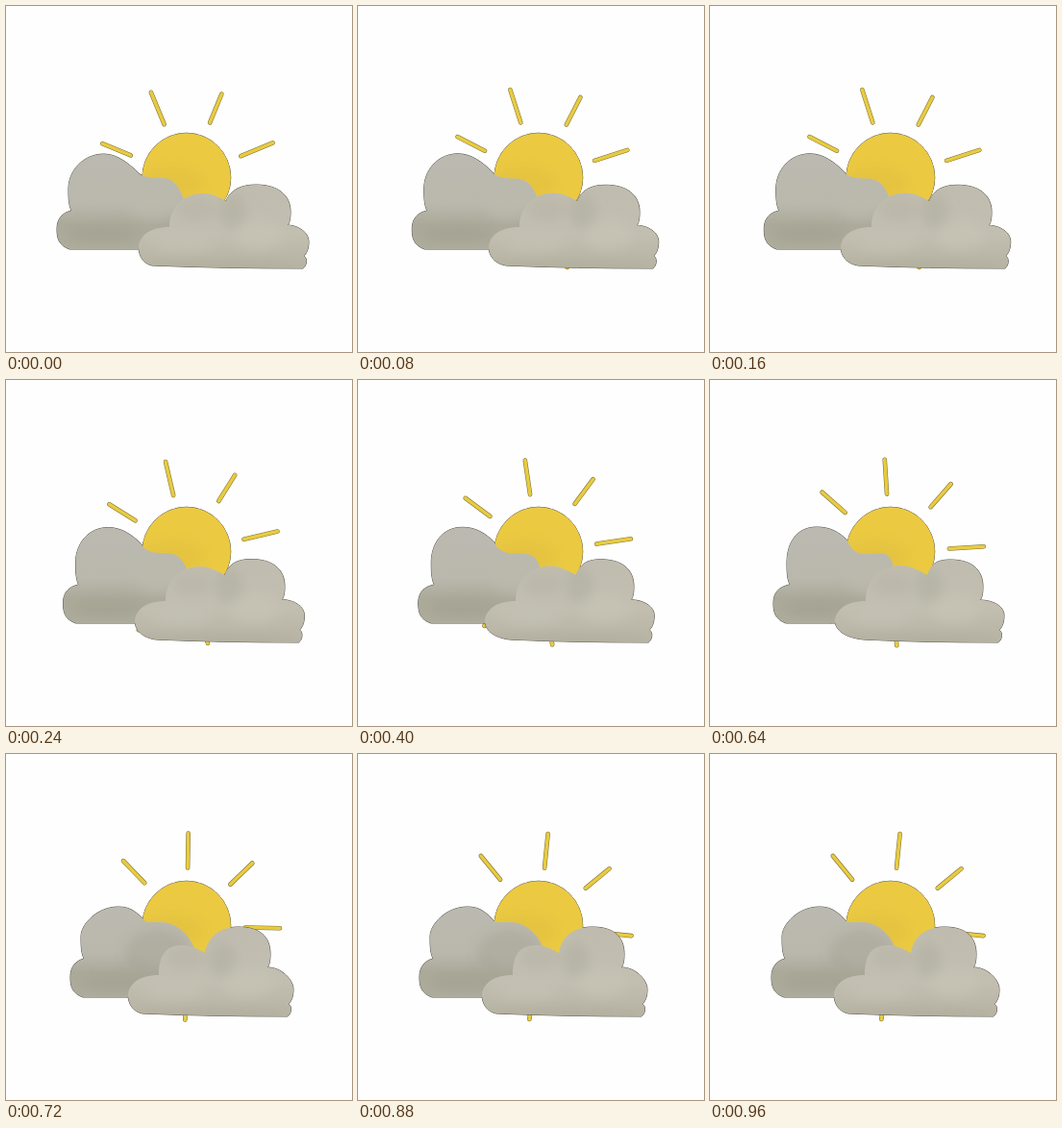
An HTML page for the animation above (1040 ms loop, 360x360 px).

```html
<!DOCTYPE html>
<html lang="en">
<head>
<meta charset="utf-8">
<title>Sun behind clouds</title>
<style>
  html, body { margin: 0; width: 100%; height: 100%; overflow: hidden; background: #fefefe; }
  svg { display: block; width: 100vw; height: 100vh; }
  .edge { fill: #56544a; stroke: #56544a; stroke-width: 1; }
  .soft { filter: url(#blur); }
  .rays line { stroke-linecap: round; }
  .rim { stroke: #7d7136; stroke-width: 4.6; }
  .ray { stroke: #e8cb40; stroke-width: 3.5; }
</style>
</head>
<body>
<svg viewBox="0 0 360 360">
  <defs>
    <path id="left"/>
    <path id="right"/>
    <ellipse id="sun" cx="187.8" cy="178.5" rx="46" ry="46.3"/>
    <clipPath id="inLeft"><use href="#left"/></clipPath>
    <clipPath id="inRight"><use href="#right"/></clipPath>
    <clipPath id="inSun"><use href="#sun"/></clipPath>
    <filter id="blur" x="-50%" y="-50%" width="200%" height="200%"><feGaussianBlur stdDeviation="6"/></filter>
    <linearGradient id="leftFill" gradientUnits="userSpaceOnUse" x1="0" y1="154" x2="0" y2="254">
      <stop offset="0" stop-color="#bbbab0"/>
      <stop offset=".52" stop-color="#bab8ad"/>
      <stop offset=".74" stop-color="#aba999"/>
      <stop offset="1" stop-color="#aeac9d"/>
    </linearGradient>
    <linearGradient id="rightFill" gradientUnits="userSpaceOnUse" x1="0" y1="182" x2="0" y2="273">
      <stop offset="0" stop-color="#bfbcaf"/>
      <stop offset=".6" stop-color="#c2bfb1"/>
      <stop offset="1" stop-color="#b6b3a3"/>
    </linearGradient>
  </defs>

  <g class="rays" id="rays"></g>
  <use href="#sun" class="edge"/>
  <use href="#left" class="edge"/>
  <use href="#right" class="edge"/>

  <use href="#sun" fill="#ebca42"/>
  <g clip-path="url(#inSun)">
    <ellipse class="soft" cx="172" cy="184" rx="34" ry="17" fill="#dfbd40" opacity=".5"/>
  </g>

  <use href="#left" fill="url(#leftFill)"/>
  <g clip-path="url(#inLeft)">
    <g id="leftShade" class="soft">
      <ellipse cx="100" cy="238" rx="38" ry="8" fill="#a09e8e" opacity=".6"/>
      <ellipse cx="152" cy="205" rx="22" ry="18" fill="#bdbaad" opacity=".7"/>
    </g>
    <ellipse id="dusk" class="soft" cx="158" cy="208" rx="34" ry="25" fill="#a5a395"/>
  </g>

  <use href="#right" fill="url(#rightFill)"/>
  <g clip-path="url(#inRight)">
    <g id="rightShade" class="soft">
      <ellipse cx="236" cy="214" rx="14" ry="18" fill="#b4b1a3" opacity=".75"/>
      <ellipse cx="198" cy="212" rx="20" ry="12" fill="#b7b4a7" opacity=".6"/>
      <ellipse cx="262" cy="238" rx="26" ry="15" fill="#c6c3b5" opacity=".8"/>
      <ellipse cx="186" cy="246" rx="32" ry="10" fill="#c5c2b4" opacity=".7"/>
      <ellipse cx="225" cy="270" rx="80" ry="5" fill="#aeab9a" opacity=".6"/>
    </g>
  </g>
</svg>
<script>
const LOOP = 1040, TICK = 80, DRIFT = 4;
const $ = id => document.getElementById(id);
const mix = (a, b, t) => a.map((v, i) => v + (b[i] - v) * t);

// lobe x, bump x, top x/y, shoulder x/y, ridge y, end x/y
const LEFT = {
  start:  [53, 65, 102, 154, 138, 174, 179, 186, 203],
  drift:  [66, 80, 111, 153, 143, 167, 181, 190, 190],
  parted: [67, 78, 117, 159, 146, 175, 175, 195, 200]
};
// left x, corner width, first bump x/y, notch x/y, second bump x/y, its right x, right x
const RIGHT = {
  start:  [138, 14, 205, 195, 229, 203, 260, 186, 296, 315],
  drift:  [130, 30, 199, 193, 226, 203, 250, 187, 284, 306],
  parted: [127, 15, 183, 199, 207, 207, 242, 180, 275, 299]
};

function leftPath([l, b, tx, ty, sx, sy, ridge, ex, ey]) {
  return `M${l + 13} 253C${l + 2} 249 ${l} 242 ${l} 232
    C${l} 221 ${l + 6} 215 ${b + 3} 213
    C${b} 206 ${b} 198 ${b} 190
    C${b} ${ty + 18} ${tx - 22} ${ty} ${tx} ${ty}
    C${tx + 14} ${ty} ${sx - 9} ${sy - 9} ${sx} ${sy}
    Q${sx + 5} ${ridge} 162 ${ridge}
    C176 ${ridge} ${ex - 6} ${ey - 14} ${ex} ${ey}
    L${ex} ${ey + 20} 165 253Z`;
}

function rightPath([l, c, p, py, n, ny, q, qy, r, x]) {
  return `M${l + c} 270C${l + c / 3} 268 ${l} 260 ${l} 250
    C${l + 2} 236 ${l + 16} 230 ${l + 32} 230
    C${l + 32} ${py + 12} ${p - 18} ${py} ${p} ${py}
    C${p + 10} ${py} ${n - 5} ${ny - 3} ${n} ${ny}
    C${n + 4} ${qy + 6} ${q - 16} ${qy} ${q} ${qy}
    C${q + 22} ${qy} ${r} ${qy + 10} ${r} ${qy + 28}
    C${r} ${qy + 35} ${r - 1} ${qy + 40} ${r - 3} ${qy + 42}
    C${x - 12} ${qy + 42} ${x} 235 ${x} 245
    C${x} 254 ${x - 3} 258 ${x - 5} 260
    C${x - 1} 263 ${x - 2} 270 ${x - 6} 273
    Q${(l + x) / 2} 273 ${l + c} 270Z`;
}

// long and short rays alternate
for (const cls of ["rim", "ray"]) {
  for (let k = 0; k < 8; k++) {
    const half = k % 2 ? 16 : 18;
    $("rays").insertAdjacentHTML("beforeend",
      `<line class="${cls}" y1="${half - 79}" y2="${-half - 79}" transform="rotate(${45 * k})"/>`);
  }
}

// clouds drift together, then switch to the parted drawing and slide
function setCloud(id, keys, path, pose, slide) {
  const late = Math.max(0, pose - DRIFT - 1);
  const key = pose > DRIFT ? keys.parted : mix(keys.start, keys.drift, pose / DRIFT);
  $(id).setAttribute("d", path(key));
  $(id).setAttribute("transform", `translate(${slide * late} 0)`);
  $(id + "Shade").setAttribute("transform", `translate(${key[0] - keys.start[0] + slide * late} 0)`);
}

let shown = -1;
function draw(now) {
  // a new drawing on every second tick, after a short first hold
  const pose = Math.ceil(Math.floor(now % LOOP / TICK) / 2);
  if (pose === shown) return;
  shown = pose;
  $("rays").setAttribute("transform", `translate(188 179.5) rotate(${4.7 * pose - 22.5})`);
  setCloud("left", LEFT, leftPath, pose, -3);
  setCloud("right", RIGHT, rightPath, pose, 2);
  $("dusk").setAttribute("opacity", pose > DRIFT ? .5 : 0);
}

const start = performance.now();
function loop() {
  draw(performance.now() - start);
  requestAnimationFrame(loop);
}
loop();
</script>
</body>
</html>
```
